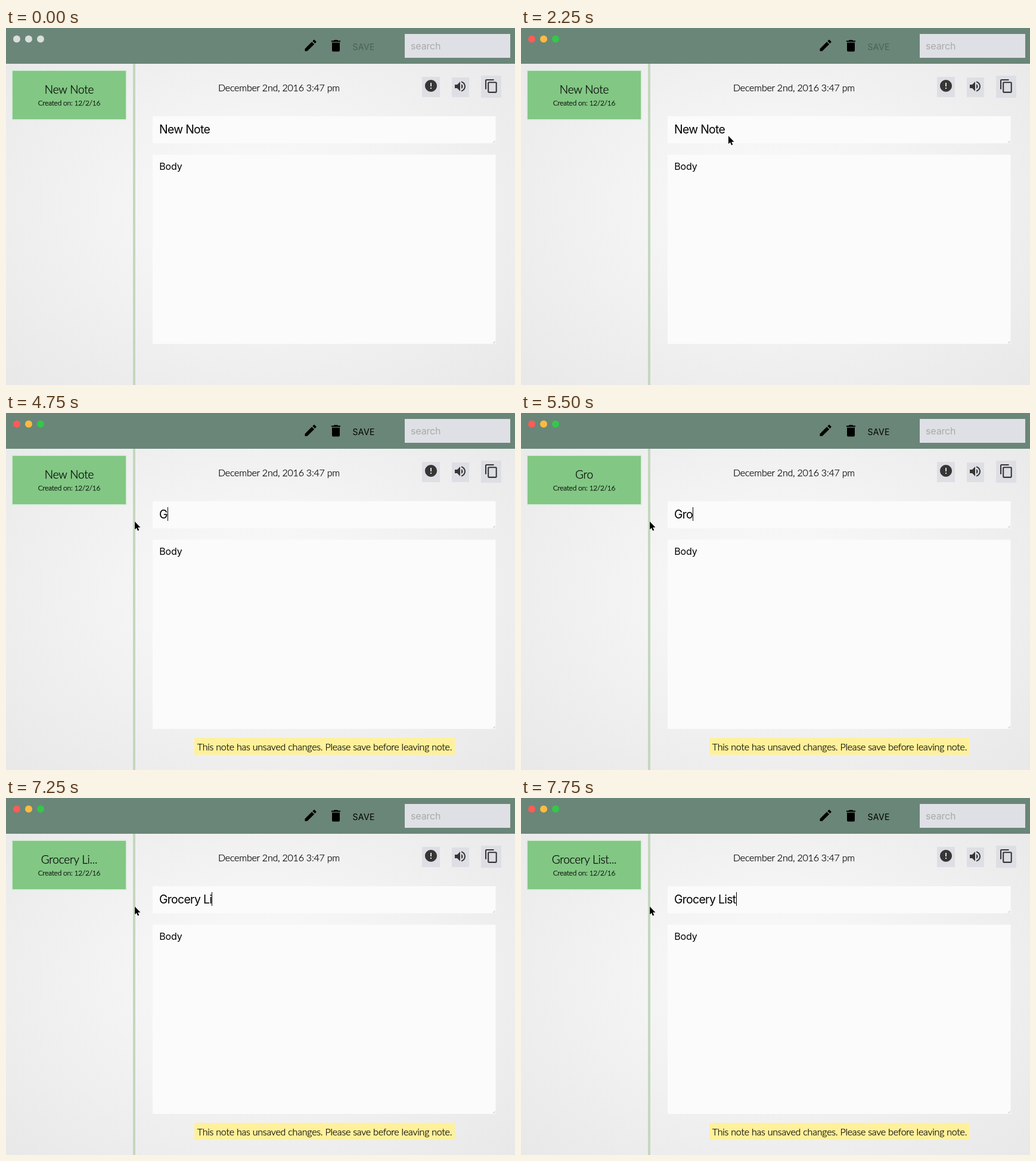
Animation of 854 by 599 pixels, one loop 8 s. Source, as an HTML page:

```html
<!DOCTYPE html>
<html lang="en">
<head>
<meta charset="utf-8">
<title>Notes</title>
<style>
  html, body { margin: 0; width: 100%; height: 100%; overflow: hidden; }
  svg { display: block; width: 854px; height: 599px; }
  text { white-space: pre; }
  .lato { font-family: Lato, sans-serif; font-weight: 300; text-anchor: middle;
    letter-spacing: -.22px; stroke: #000; stroke-width: .25px; }
  .ui { font-family: Inter, sans-serif; }
</style>
</head>
<body>
<svg viewBox="0 0 854 599">
  <defs>
    <radialGradient id="glow" gradientUnits="userSpaceOnUse" cx="0" cy="0" r="1"
      gradientTransform="translate(427 300) scale(604 424)">
      <stop offset="0" stop-color="#fbfbfc"/>
      <stop offset="1" stop-color="#e8e8e9"/>
    </radialGradient>
    <path id="grip" d="M0 3.5L3.5 0M2 3.5L3.5 2" stroke="#aaa" stroke-width=".7"/>
  </defs>
  <rect width="854" height="599" fill="url(#glow)"/>
  <rect width="854" height="60" fill="#6a8678"/>
  <g id="lights">
    <circle cx="18" cy="18.5" r="6"/>
    <circle cx="38" cy="18.5" r="6"/>
    <circle cx="58" cy="18.5" r="6"/>
  </g>

  <path transform="translate(498.3 16.6) scale(1.06)" d="M3 17.25V21h3.75L17.81 9.94l-3.75-3.75L3 17.25zM20.71 7.04c.39-.39.39-1.02 0-1.41l-2.34-2.34c-.39-.39-1.02-.39-1.41 0l-1.83 1.83 3.75 3.75 1.83-1.83z"/>
  <path transform="translate(540.5 16.8) scale(1.083)" d="M6 19c0 1.1.9 2 2 2h8c1.1 0 2-.9 2-2V7H6v12zM19 4h-3.5l-1-1h-5l-1 1H5v2h14V4z"/>
  <text id="save" class="ui" x="581.5" y="37" font-size="14" letter-spacing=".35">SAVE</text>
  <rect x="669" y="10" width="177" height="40" fill="#dfe0e5"/>
  <text class="ui" x="679" y="36" font-size="16" letter-spacing="-.15" fill="#a9a9aa">search</text>

  <rect x="213" y="60" width="4" height="539" fill="#c4d7bd"/>
  <rect x="10.25" y="71.25" width="191.5" height="82.5" fill="#82c784" stroke="#d4ecd4" stroke-width="1.5"/>
  <text id="name" class="lato" x="106" y="110" font-size="19"></text>
  <text class="lato" x="106" y="130" font-size="12">Created on: 12/2/16</text>

  <text class="lato" x="458" y="106" font-size="16">December 2nd, 2016 3:47 pm</text>
  <g fill="#dedfe4">
    <rect x="698" y="82" width="30" height="34"/>
    <rect x="748" y="83" width="29" height="33"/>
    <rect x="797" y="80" width="34" height="37"/>
  </g>
  <g fill="#363637">
    <path transform="translate(701 85)" d="M12 2C6.48 2 2 6.48 2 12s4.48 10 10 10 10-4.48 10-10S17.52 2 12 2zm1 15h-2v-2h2v2zm0-4h-2V7h2v6z"/>
    <path transform="translate(750 86)" d="M3 9v6h4l5 5V4L7 9H3zm13.5 3c0-1.77-1.02-3.29-2.5-4.03v8.05c1.48-.73 2.5-2.25 2.5-4.02zM14 3.23v2.06c2.89.86 5 3.54 5 6.71s-2.11 5.85-5 6.71v2.06c4.01-.91 7-4.49 7-8.77s-2.99-7.86-7-8.77z"/>
    <path transform="translate(801.9 85) scale(1.04)" d="M16 1H4c-1.1 0-2 .9-2 2v14h2V3h12V1zm3 4H8c-1.1 0-2 .9-2 2v14c0 1.1.9 2 2 2h11c1.1 0 2-.9 2-2V7c0-1.1-.9-2-2-2zm0 16H8V7h11v14z"/>
  </g>

  <rect x="246" y="148" width="575.5" height="45.5" fill="#fbfbfb"/>
  <rect x="246" y="212.5" width="575.5" height="317.5" fill="#fbfbfb"/>
  <use href="#grip" x="817" y="189"/>
  <use href="#grip" x="817" y="525.5"/>
  <rect id="mark" y="158" height="23" fill="#b3d7fe"/>
  <text id="title" class="ui" x="257" y="177" font-size="19.4" letter-spacing="-.68"></text>
  <rect id="caret" y="158" width="1" height="23"/>
  <text class="ui" x="257.3" y="238" font-size="16" letter-spacing="-.15">Body</text>

  <g id="alert">
    <rect x="316" y="545" width="437" height="28.5" fill="#fff19b"/>
    <text class="lato" x="534.5" y="566" font-size="16">This note has unsaved changes. Please save before leaving note.</text>
  </g>
  <path id="arrow" d="M0 0V13.5L3 10.8L5 15.6L7.3 14.7L5.3 10H9.5Z" stroke="#fff" stroke-width="1" paint-order="stroke"/>
</svg>
<script>
const LOOP = 8000, LEFT = 257;
const el = id => document.getElementById(id);
const [lights, save, nameText, mark, title, caret, alertBox, arrow] =
  ['lights', 'save', 'name', 'mark', 'title', 'caret', 'alert', 'arrow'].map(el);
const lamps = [...lights.children];
const lampColors = ['#fc5c58', '#fcbb40', '#34c84a'];
const phrase = 'Grocery List';

// [start ms, x, y] of the pointer
const pointer = [[750, 366, 155], [1000, 330, 179], [1250, 343, 175], [1500, 345, 175],
  [2000, 354, 175], [2250, 348, 181], [3000, 256, 182], [3250, 216, 182]];
// [start ms, letters in the field, letters in the side list]
const typing = [[4750, 1, 0], [5000, 1, 1], [5250, 2, 2], [5500, 3, 3], [5750, 4, 3],
  [6000, 5, 4], [6250, 6, 6], [6500, 8, 7], [7000, 9, 9], [7250, 10, 10],
  [7500, 11, 11], [7750, 12, 12]];

const latest = (steps, t) => steps.filter(s => s[0] <= t).pop();
const show = (node, on) => node.setAttribute('visibility', on ? 'visible' : 'hidden');
const setText = (node, s) => { if (node.textContent !== s) node.textContent = s; };

function draw(t) {
  const typed = latest(typing, t), pos = latest(pointer, t);
  const [, field, side] = typed || [0, 0, 0];
  setText(title, typed ? phrase.slice(0, field) : 'New Note');
  setText(nameText, side ? phrase.slice(0, side) + (side > 9 ? '...' : '') : 'New Note');

  lamps.forEach((c, i) => c.setAttribute('fill', t < 1750 ? '#dadedb' : lampColors[i]));
  save.setAttribute('fill', typed ? '#000' : '#4c6056');
  show(alertBox, typed);

  const end = LEFT + title.getComputedTextLength();
  show(caret, typed || (t >= 2750 && t < 3000));
  caret.setAttribute('x', Math.round(end));

  const from = t < 3250 ? LEFT + 14 : LEFT;
  show(mark, t >= 3000 && !typed);
  mark.setAttribute('x', from);
  mark.setAttribute('width', Math.max(0, end - from));

  show(arrow, pos);
  if (pos) arrow.setAttribute('transform', `translate(${pos[1]} ${pos[2]})`);
}

const begin = performance.now();
function tick() {
  draw((performance.now() - begin) % LOOP);
  requestAnimationFrame(tick);
}
draw(0);
requestAnimationFrame(tick);
</script>
</body>
</html>
```
